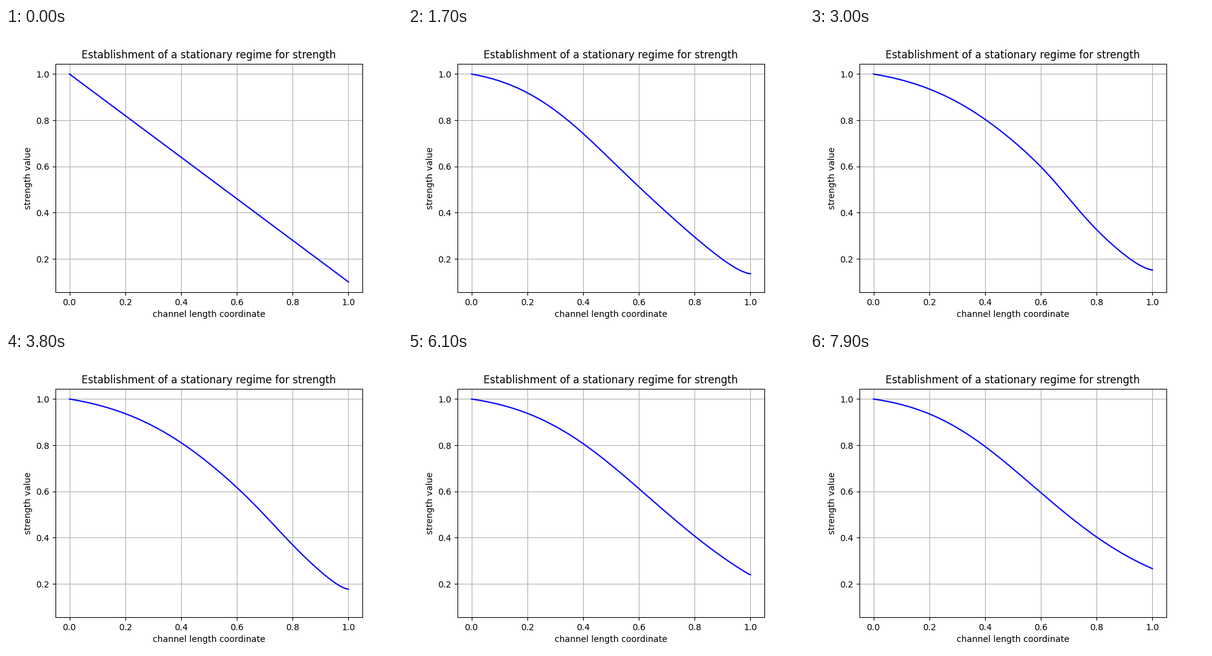
Animation of 640x480 px, one loop 8 s. Source, as a matplotlib script:

```python
import numpy as np
import matplotlib.pyplot as plt
from matplotlib.animation import FuncAnimation

FRAMES, INTERVAL = 80, 100

# Key moments (seconds) of the wave that steepens the curve.
TIMES = np.array([0, 0.8, 1.7, 3.0, 4.6, 6.1, 7.9])
CENTRE = np.array([0, .32, .49, .70, .73, .62, .56])       # steepest place
STEEPNESS = np.array([.9, 1.02, 1.14, 1.17, 1.16, 1.055, 1.04])
FADE = np.array([0, .38, .95, 3.65, 4.2, 2.75, 3.6])       # easing past it


def smooth(t, vals):
    """Cubic Hermite value at time t through the key moments."""
    slopes = np.gradient(vals, TIMES, edge_order=2)
    i = min(np.searchsorted(TIMES, t, side="right"), len(TIMES) - 1) - 1
    h = TIMES[i + 1] - TIMES[i]
    u = (t - TIMES[i]) / h
    return ((1 + 2 * u) * (1 - u) ** 2 * vals[i]
            + u * (1 - u) ** 2 * h * slopes[i]
            + u * u * (3 - 2 * u) * vals[i + 1]
            + u * u * (u - 1) * h * slopes[i + 1])


def strength(x, t):
    """Integrate the local steepness from the inlet, where strength is 1."""
    c, m, fade = (smooth(t, v) for v in (CENTRE, STEEPNESS, FADE))
    d = x - c
    width = 0.53 * c + 0.25 * np.exp(-2 * t)
    steep = m * np.exp(-d ** 2 * np.where(d < 0, 0.5 / width ** 2, fade))
    # A sharp front forms around three seconds.
    steep += 0.27 * np.exp(-((t - 3) / 0.9) ** 2 - (d / 0.075) ** 2 / 2)
    # The curve levels out in a thin layer at the outlet.
    layer = 0.039 * t * np.exp(-(t / 2.1) ** 2 / 2) + 1e-6
    if t > 0:
        steep *= 1 - 0.8 * np.exp((x - 1) / layer)
    drops = (steep[1:] + steep[:-1]) / 2 * np.diff(x)
    return 1 - np.concatenate([[0], np.cumsum(drops)])


x = np.linspace(0, 1, 401)
fig, ax = plt.subplots(figsize=(6.4, 4.8), dpi=100)
line, = ax.plot(x, strength(x, 0), color="blue", lw=1.5)
ax.set(xlim=(-0.05, 1.05), ylim=(0.055, 1.045),
       xlabel="channel length coordinate", ylabel="strength value",
       title="Establishment of a stationary regime for strength")
ax.set_xticks(np.arange(0, 1.1, 0.2))
ax.set_yticks(np.arange(0.2, 1.1, 0.2))
ax.grid()


def update(i):
    line.set_ydata(strength(x, i * INTERVAL / 1000))
    return line,


anim = FuncAnimation(fig, update, frames=FRAMES, interval=INTERVAL,
                     repeat=True, repeat_delay=0)
plt.show()
```
